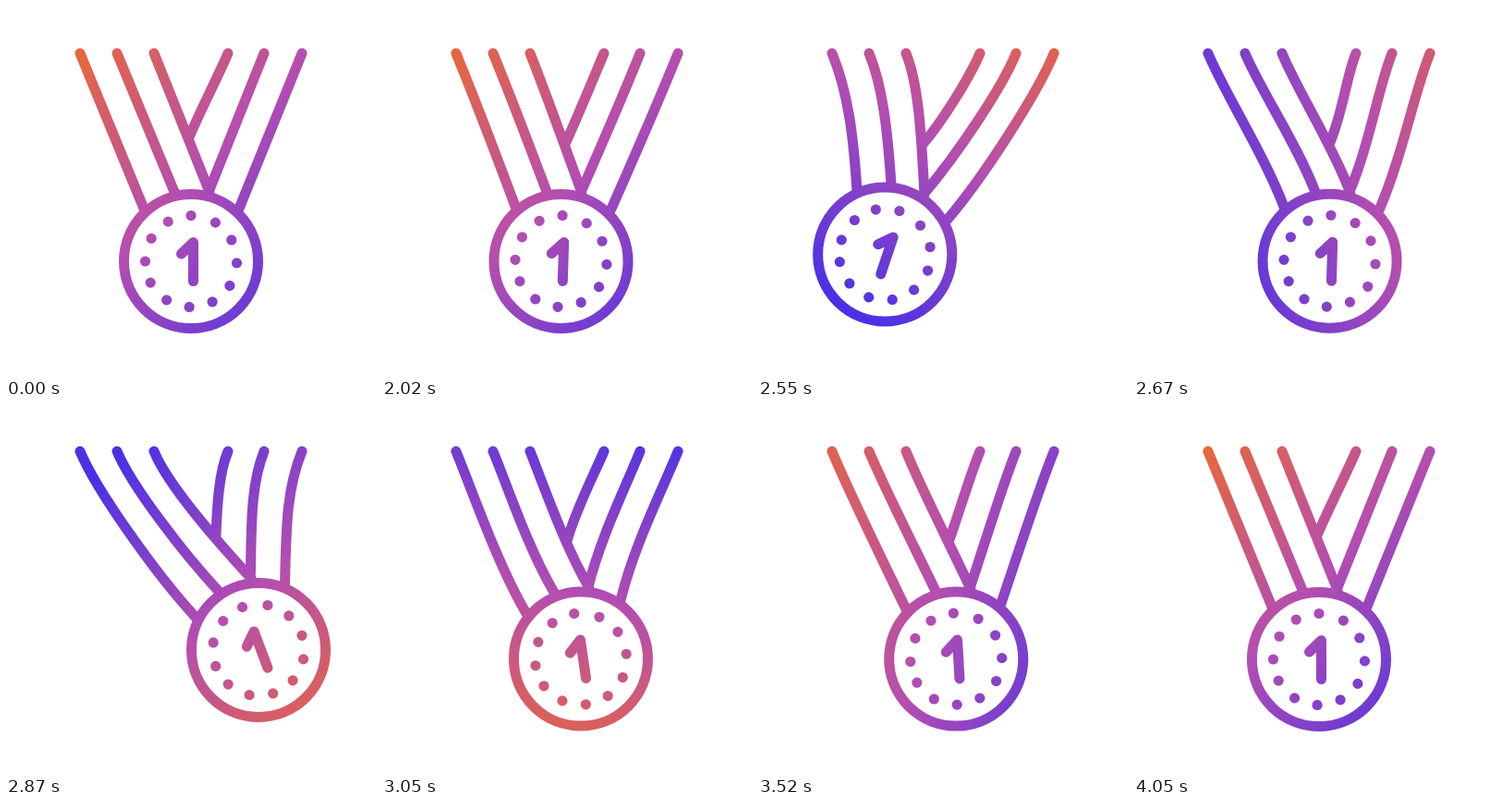
An HTML page that plays this animation: 400x400 px, repeating every 4.1 s.

```html
<!DOCTYPE html>
<html lang="en">
<head>
<meta charset="utf-8">
<title>Swinging medal</title>
<style>
  html, body { margin: 0; width: 100%; height: 100%; overflow: hidden; background: #fff; }
  svg { display: block; width: 100%; height: 100%; }
</style>
</head>
<body>
<svg viewBox="0 0 400 400">
  <defs>
    <linearGradient id="tint" gradientUnits="userSpaceOnUse">
      <stop offset="0" stop-color="#ea6838"/>
      <stop offset=".49" stop-color="#b44eb0"/>
      <stop offset="1" stop-color="#4a31e6"/>
    </linearGradient>
  </defs>
  <g fill="none" stroke="url(#tint)" stroke-width="11" stroke-linecap="round" stroke-linejoin="round">
    <path id="lines"/>
    <circle id="ring" r="72.5"/>
  </g>
  <path id="dots" fill="url(#tint)"/>
</svg>
<script>
const LOOP = 4100, STEP = 25, REST = [200, 276];
const DEG = Math.PI / 180;
const $ = id => document.getElementById(id);
const clamp = v => Math.min(1, Math.max(0, v));
const mix = (a, b, k) => a + (b - a) * k;
const mixPoint = (a, b, k) => [mix(a[0], b[0], k), mix(a[1], b[1], k)];
const fmt = p => p.map(v => v.toFixed(2)).join(' ');

// Turning points of the swing: time, sideways offset
const SWING = [[2010, 0], [2466, -68], [2866, 73], [3236, -45], [3620, 18], [4050, 0]];

// Top end and lower end of each ribbon line at rest
const RIBBONS = [
  [[80, 51], [149, 219]], [[120, 51], [182, 201]], [[160, 51], [220, 201]],
  [[279, 51], [219, 201]], [[320, 51], [252, 219]]
];
const SHORT = [[240, 51], [200, 146]];

const easeOut = p => 1 - (1 - p) ** 3;
const easeInOut = p => p < .5 ? 4 * p ** 3 : 1 - 4 * (1 - p) ** 3;

function bezierEase(x, x1, x2) {
  let lo = 0, hi = 1;
  for (let i = 0; i < 24; i++) {
    const u = (lo + hi) / 2, v = 1 - u;
    if (3 * v * v * u * x1 + 3 * v * u * u * x2 + u ** 3 < x) lo = u; else hi = u;
  }
  return lo * lo * (3 - 2 * lo);
}

function swing(t) {
  for (let i = 1; i < SWING.length; i++) {
    const [t0, x0] = SWING[i - 1], [t1, x1] = SWING[i];
    if (t < t1) return mix(x0, x1, (i === 1 ? easeOut : easeInOut)(clamp((t - t0) / (t1 - t0))));
  }
  return 0;
}

function drawMedal(t) {
  const x = swing(t);
  const turn = -.283 * swing(t - (t > 2466 ? 17 : 0)) * DEG;
  const cos = Math.cos(turn), sin = Math.sin(turn);
  const center = [REST[0] + x, REST[1] - 7 * (x / 61) ** 2];
  const rotate = ([a, b]) => [a * cos - b * sin, a * sin + b * cos];
  const place = (a, b) => {
    const r = rotate([a, b]);
    return [center[0] + r[0], center[1] + r[1]];
  };

  // The upper handle keeps its rest direction, the lower one turns with the medal
  const curve = ([top, low], end) => {
    const along = [low[0] - top[0], low[1] - top[1]];
    const back = rotate(along);
    return [top, mixPoint(top, low, .25), [end[0] - back[0] / 3, end[1] - back[1] / 3], end];
  };
  const toPath = c => `M${fmt(c[0])}C${c.slice(1).map(fmt).join(' ')}`;

  const curves = RIBBONS.map(r => curve(r, place(r[1][0] - REST[0], r[1][1] - REST[1])));
  const k = .64 + .04 * clamp(Math.abs(x) / 6), n = 1 - k;
  const joint = [0, 1].map(i => {
    const [a, b, c, d] = curves[2].map(p => p[i]);
    return a * n ** 3 + 3 * b * n * n * k + 3 * c * n * k * k + d * k ** 3;
  });
  curves.push(curve(SHORT, joint));

  const digit = 'M' + [[-10.5, -8], [2.5, -20.5], [2.5, 21.5]].map(p => fmt(place(...p))).join('L');
  $('lines').setAttribute('d', curves.map(toPath).join('') + digit);
  $('ring').setAttribute('cx', center[0]);
  $('ring').setAttribute('cy', center[1]);

  let dots = '';
  for (let i = 0; i < 12; i++) {
    const a = (i * 30 - 90 + (i > 0 && i < 9 ? 2.2 : 0)) * DEG;
    const p = place(49.5 * Math.cos(a), 49.5 * Math.sin(a));
    dots += `M${fmt([p[0] - 5.6, p[1]])}a5.6 5.6 0 1 0 11.2 0a5.6 5.6 0 1 0 -11.2 0`;
  }
  $('dots').setAttribute('d', dots);
}

function drawTint(t) {
  const angle = (42 + 360 * bezierEase(clamp((t - 2000) / 2000), .35, .45)) * DEG;
  const dx = Math.cos(angle), dy = Math.sin(angle);
  const shift = 58 * Math.max(0, -dx);
  [-200, 195].forEach((d, i) => {
    $('tint').setAttribute('x' + (i + 1), 200 + dx * (d - shift));
    $('tint').setAttribute('y' + (i + 1), 200 + dy * (d - shift));
  });
}

const start = performance.now();
function frame() {
  const now = (performance.now() - start) % LOOP;
  const t = Math.floor((now + 5) / STEP) * STEP;
  drawMedal(t);
  drawTint(t);
  requestAnimationFrame(frame);
}
frame();
</script>
</body>
</html>
```
